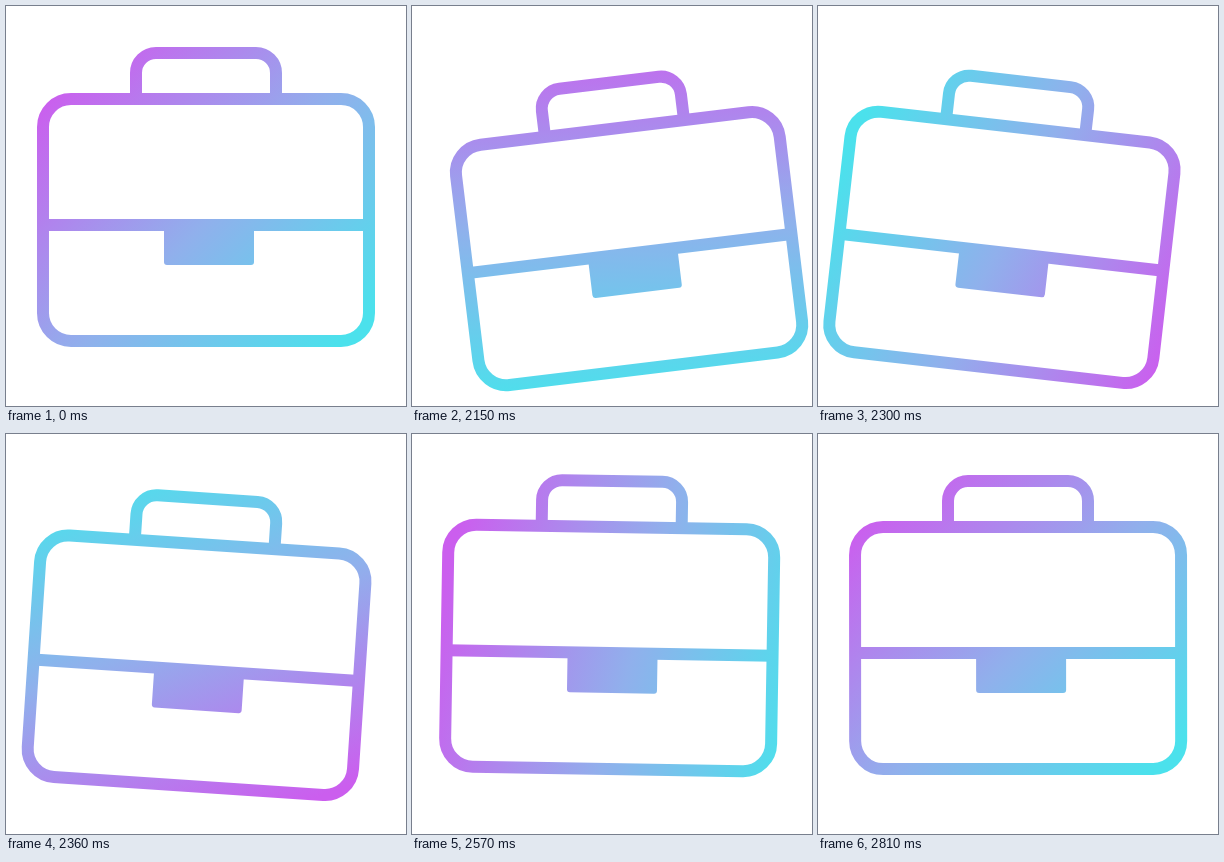
An HTML page that plays this animation: 400x400 px, repeating every 2.84 s.

```html
<!DOCTYPE html>
<html lang="en">
<head>
<meta charset="utf-8">
<title>Briefcase</title>
<style>
  html, body { margin: 0; width: 100%; height: 100%; overflow: hidden; background: #fff; }
  svg { display: block; width: 100%; height: 100%; }
</style>
</head>
<body>
<svg viewBox="0 0 400 400">
  <defs>
    <linearGradient id="tint" gradientUnits="userSpaceOnUse" x1="32" y1="178" x2="412" y2="178">
      <stop offset="0" stop-color="#cb5eee"/>
      <stop offset=".53" stop-color="#90b0ec"/>
      <stop offset="1" stop-color="#4be1ec"/>
    </linearGradient>
  </defs>
  <g id="bag" fill="none" stroke="url(#tint)" stroke-width="12">
    <!-- One path keeps the gradient valid for the straight divider too -->
    <path d="M130 93V67a20 20 0 0 1 20-20H250a20 20 0 0 1 20 20V93M37 219H363"/>
    <rect x="37" y="93" width="326" height="242" rx="28"/>
    <path d="M158 215H248V256a3 3 0 0 1-3 3H161a3 3 0 0 1-3-3Z" fill="url(#tint)" stroke="none"/>
  </g>
</svg>
<script>
const LOOP = 2840, START = 2000, STEP = 30;
const PIVOT = [200, 72];
const bag = document.getElementById('bag');
const tint = document.getElementById('tint');

// Swing extremes: [ms after the start, degrees]
const swing = [[0, 0], [150, -6.9], [300, 6.5], [470, -3.2], [610, 1.9], [720, -0.8], [825, 0]];

const ease = p => (1 - Math.cos(Math.PI * Math.min(1, Math.max(0, p)))) / 2;

function angleAt(t) {
  const i = swing.findIndex(([time]) => time > t);
  if (i < 1) return 0;
  const [t0, a0] = swing[i - 1], [t1, a1] = swing[i];
  return a0 + (a1 - a0) * ease((t - t0) / (t1 - t0));
}

function dropAt(t) {
  const p = (t - 6) / 428;
  return p > 0 && p < 1 ? 34 * Math.sin(Math.PI * p) : 0;
}

function draw(now) {
  const elapsed = now % LOOP - START;
  const t = Math.max(0, Math.floor(elapsed / STEP) * STEP);
  const turn = 45 + 360 * ease((t / 720) ** 0.9);
  bag.setAttribute('transform', `translate(0 ${dropAt(t)}) rotate(${angleAt(t)} ${PIVOT})`);
  tint.setAttribute('gradientTransform', `rotate(${turn} 222 178)`);
}

const begin = performance.now();
function tick() {
  draw(performance.now() - begin);
  requestAnimationFrame(tick);
}
tick();
</script>
</body>
</html>
```
